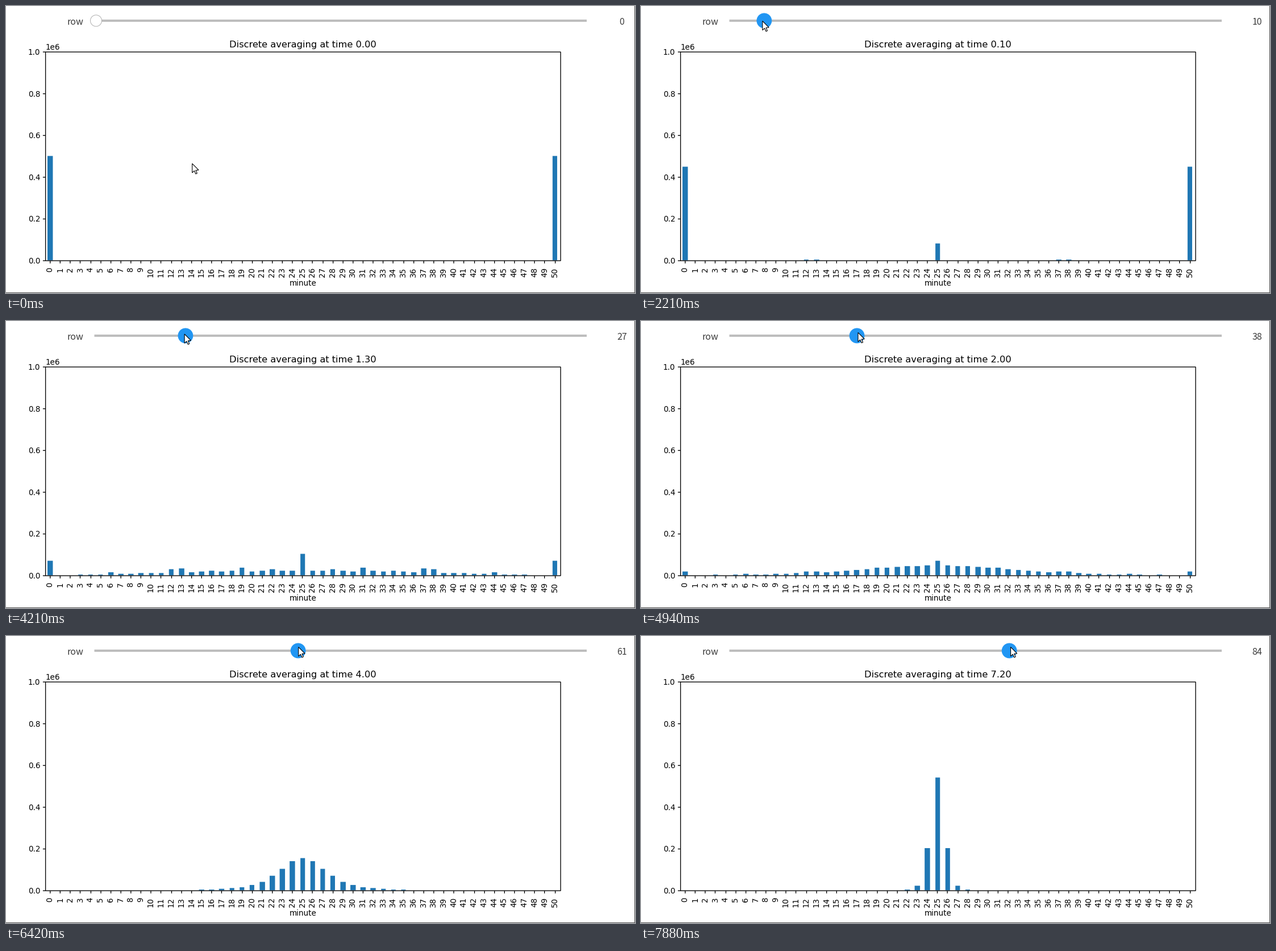
These frames come from a looping animation (1107x506 px, 8 s). A matplotlib script:

```python
import numpy as np
import matplotlib.pyplot as plt
from matplotlib.animation import FuncAnimation
from matplotlib.patches import Circle, Polygon, Rectangle

W, H, DPI = 1107, 506, 64
PT = 72 / DPI                      # points per pixel
LOOP, STEP = 8000, 40              # ms

# The chart is laid out on a coarse grid of U-pixel cells.
U = 1.353
X0, BASE = 68.92, 448.4
GRID_W, GRID_H = 669.6, 271.8
LEFT, RIGHT = X0 + U / 2, X0 + U * 670.5
BOTTOM = BASE + U / 2
TOP = BOTTOM - U * 272

STATES = 51
PITCH = GRID_W / STATES
CENTERS = PITCH * (np.arange(STATES) + 0.5)

KNOB_X, KNOB_Y, ROW_PX = 158.5, 25.9, 5.83
BLUE, GREY = "#2196f3", "#bdbdbd"
PLOT_FONT, UI_FONT = "DejaVu Sans", "Noto Sans CJK JP"

# Timing of the approach, the press and the drag, in ms
MOVE, MOVE_STEP, MOVES = 250, 140, 5
PRESS, DRAG, DRAG_STEP = 1100, 1360, 141.7

# Drag ticks with the slider's row and the row the lagging chart shows
KEYS = [-1, 10, 12, 20, 30, 40, 46]
SLIDER = [0, 16, 17, 27, 50, 72, 84]
CHART = [0, 1, 1, 13, 28, 52, 72]

REST, ON_KNOB = np.array([327.7, 277.8]), np.array([153.0, 21.5])
ARROW = np.array([(0, 0), (0, 16.2), (3.7, 12.7), (6.2, 18.3), (8.6, 17.2),
                  (6.2, 11.8), (11.3, 11.4)])


def flow(p):
    """Rate of change when random pairs split their sum evenly."""
    pairs = np.convolve(p, p)
    gain = 2 * pairs[::2]
    gain[:-1] += pairs[1::2]
    gain[1:] += pairs[1::2]
    return gain - 2 * p


def averaging(rows, dt=0.1, sub=10):
    p = np.zeros(STATES)
    p[[0, -1]] = 0.5
    out = [p]
    h = dt / sub
    for _ in range(rows):
        for _ in range(sub):
            p = p + h * flow(p + h / 2 * flow(p))
        out.append(p)
    return out


HISTORY = averaging(max(CHART))

fig = plt.figure(figsize=(W / DPI, H / DPI), dpi=DPI, facecolor="white")
ax = fig.add_axes([0, 0, 1, 1])
ax.axis("off")


def line(x0, y0, x1, y1, color="black", width=U, z=3):
    ax.plot([x0, x1], [y0, y1], color=color, lw=width * PT, zorder=z,
            solid_capstyle="butt", snap=False)


def label(x, y, s, size=10 * U, font=PLOT_FONT, color="black", ha="center",
          rotation=0):
    return ax.text(x, y, s, fontsize=size * PT, family=font, color=color,
                   ha=ha, va="baseline", rotation=rotation,
                   rotation_mode="anchor", zorder=4)


# Chart frame, ticks and labels
ax.add_patch(Rectangle((LEFT, TOP), RIGHT - LEFT, BOTTOM - TOP, fill=False,
                       ec="black", lw=U * PT, zorder=3, snap=False))
for v in np.linspace(0, 1, 6):
    y = BOTTOM + (TOP - BOTTOM) * v
    line(LEFT - 4.7, y, LEFT, y)
    label(60.2, y + 5, f"{v:.1f}", ha="right")
for k, c in enumerate(CENTERS):
    x = X0 + U * (np.floor(c) + 0.5)
    line(x, BOTTOM, x, BOTTOM + 4.7)
    label(X0 + U * c + 3.6, 464.5 if k < 10 else 469.5, str(k), rotation=90)
label(LEFT, 77, "1e6", ha="left")
label(522.6, 492.8, "minute")
title = label(522.4, 73, "", size=12 * U)

edges = X0 + U * np.round(CENTERS - PITCH / 4)
widths = X0 + U * np.round(CENTERS + PITCH / 4) - edges
bars = ax.bar(edges, np.zeros(STATES), width=widths, bottom=BASE,
              align="edge", color="#1f77b4", zorder=2)
for bar in bars:
    bar.set_snap(False)

# Slider
label(122, 32.5, "row", 16, UI_FONT, "#3c3c3c")
number = label(1084, 32.5, "", 16, UI_FONT, "#3c3c3c")
line(155.5, KNOB_Y, 1022, KNOB_Y, GREY, 4, 2)
knob = ax.add_patch(Circle((KNOB_X, KNOB_Y), 10, lw=PT, zorder=5))
cursor = ax.add_patch(Polygon(ARROW, closed=True, fc="white", ec="black",
                              lw=1.1 * PT, joinstyle="miter", zorder=6))

# Window edges
for x, y, w, h in [(W - 1, 0, 1, H), (0, H - 1, W, 1)]:
    ax.add_patch(Rectangle((x, y), w, h, fc="#505050", lw=0, zorder=7))

ax.set_xlim(0, W)
ax.set_ylim(H, 0)


def pointer(now, tick, pos):
    if now < PRESS:
        u = np.clip((now - MOVE) // MOVE_STEP + 1, 0, MOVES) / MOVES
        return REST + (ON_KNOB - REST) * u * u * (3 - 2 * u)
    x = KNOB_X + ROW_PX * pos + 0.16 * tick - 5
    return np.array([x, 19.5 + 9.5 * np.exp(-((tick - 11) / 9) ** 2)])


def draw(i):
    now = i * STEP + STEP - 1
    tick = np.clip((now - DRAG) // DRAG_STEP, KEYS[0], KEYS[-1])

    pos = np.interp(tick, KEYS, SLIDER)
    row = round(pos)
    hover = now >= MOVE + MOVE_STEP * (MOVES - 1)
    number.set_text(str(row))
    knob.center = KNOB_X + ROW_PX * row, KNOB_Y
    knob.set_radius(12.9 if now >= PRESS else 10)
    knob.set_facecolor(BLUE if hover else "white")
    knob.set_edgecolor(BLUE if hover else "#b0b0b0")
    cursor.set_xy(ARROW + pointer(now, tick, pos))

    shown = round(np.interp(tick, KEYS, CHART))
    title.set_text(f"Discrete averaging at time {shown / 10:.2f}")
    for bar, p in zip(bars, HISTORY[shown]):
        bar.set_height(-U * np.round(GRID_H * p))
    return [number, knob, cursor, title, *bars]


anim = FuncAnimation(fig, draw, frames=LOOP // STEP, interval=STEP,
                     repeat=True, repeat_delay=0, blit=False)
plt.show()
```
